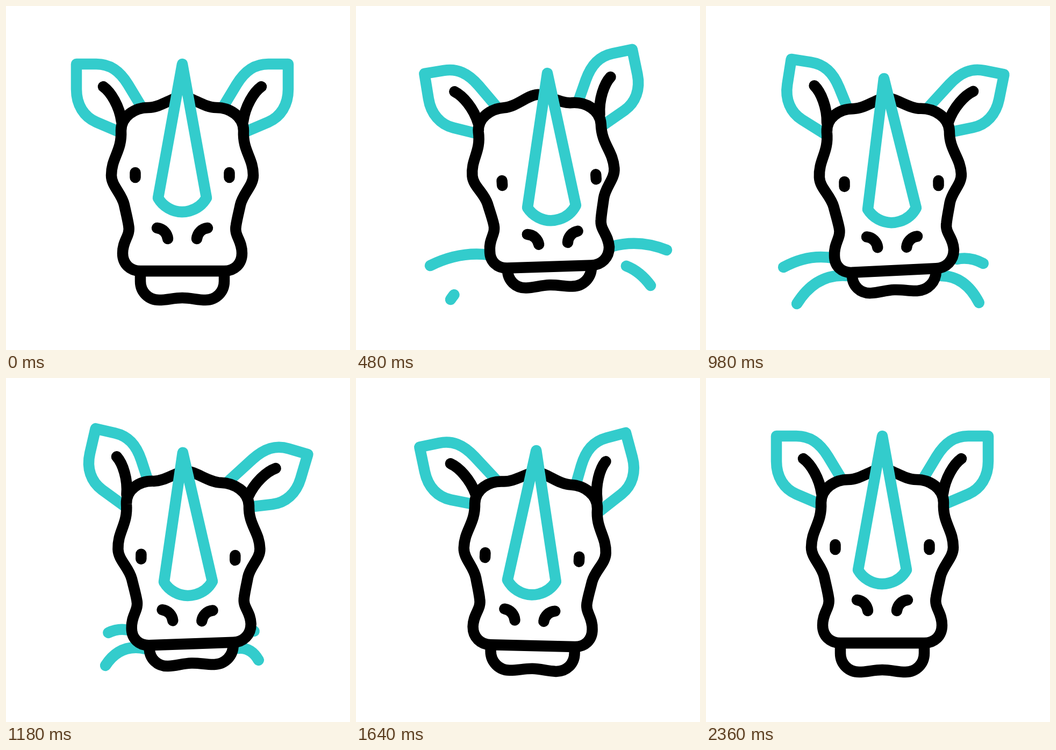
Recreate the animation shown at these times as an HTML page with a canvas. Size 640 by 640 pixels, loop 2.4 s.

```html
<!DOCTYPE html>
<html lang="en">
<head>
<meta charset="utf-8">
<title>Grazing rhino</title>
<style>
  html, body { margin: 0; width: 100%; height: 100%; overflow: hidden; background: #fff; }
  canvas { display: block; width: 100vmin; height: 100vmin; }
</style>
</head>
<body>
<canvas id="stage" width="640" height="640"></canvas>
<script>
const ctx = document.getElementById('stage').getContext('2d');
const TEAL = '#33cccc', BLACK = '#000', LOOP = 2400, AXIS = 328, DEG = Math.PI / 180;
const lerp = (a, b, u) => a + (b - a) * u;
const clamp = u => Math.max(0, Math.min(1, u));

// Smooth curve through timed values, flat at every local extreme.
function track(times, values, t) {
  const last = times.length - 1;
  if (t <= times[0]) return values[0];
  if (t >= times[last]) return values[last];
  const i = times.findIndex(time => time > t) - 1;
  const slope = k => {
    if (k === 0 || k === last) return 0;
    const before = values[k] - values[k - 1], after = values[k + 1] - values[k];
    return before * after <= 0 ? 0 : (before + after) / (times[k + 1] - times[k - 1]);
  };
  const d = times[i + 1] - times[i], u = (t - times[i]) / d, v = 1 - u;
  return v * v * (1 + 2 * u) * values[i] + u * u * (3 - 2 * u) * values[i + 1]
    + d * u * v * (v * slope(i) - u * slope(i + 1));
}

const POSE_TIMES = [0, 240, 480, 740, 980, 1380, 1920, 2360];
const POSE = {
  skullX:  [0, 8, 14, 12.5, 11, 9, 4.5, 0],
  skullY:  [0, -10, -5, -2, 1.5, 5.5, 6.5, 0],
  skullTurn: [0, -5, -3.8, -2.3, -0.6, 1.8, 2.8, 0],
  muzzleX: [0, 18, 32, 23.5, 22, 10.5, -6, 0],
  muzzleY: [0, -10, -8, -4, -1, 3.5, 6, 0],
  muzzleTurn: [0, -3, -1.9, 0, -2.8, -0.6, 2.7, 0],
  faceX:   [0, 20, 34, 25, 17.5, 4, -5.5, 0],
  faceY:   [0, -3, 9, 13, 16, 20.5, 14, 0],
  tipX:    [0, 17, 28, 23, 3, 2, 13, 0],
  tipY:    [0, 2, 17, 23, 27, 33, 16, 0],
  hornX:   [0, 21, 36, 27, 18, 5, -4.5, 0],
  hornY:   [0, 0, 16, 18.5, 20, 23, 14, 0],
  jaw:     [0, 0, -16, -14.5, -14, -14, 0, 0]
};
const EAR_TIMES = [0, 240, 440, 480, 610, 740, 980, 1180, 1380, 1600, 1920, 2150, 2360];
const EAR_TURN = [0, -16, -8.5, -9.2, -15, -12, 8.9, 13, 11.6, -13, 12.2, -15, 0];

// Left halves; the right halves are mirrored.
const HEAD = [[328,169], [310,169],[288,189],[265,189], [240,189],[214,205],[214,232],
  [216,270],[196,282],[196,315], [196,335],[215,348],[220,370], [222,380],[226,395],[228,408],
  [232,428],[217,435],[217,460], [217,480],[231,493],[250,493]];
const JAW = [[328,543], [312,543],[300,547],[285,547], [265,547],[250,532],[250,512],
  [250,506],[250,500],[250,493]];

const GRASS_TIMES = [480, 740, 980, 1180, 1380, 1520];
const GRASS = [
  { side: -1, reach: 113, bend: [0, -17], grow: [300, 460],
    x: [138, 139, 144, 190, 260, 260], y: [483, 460, 486, 474, 470, 470], root: [463, 455, 469, 470, 470, 470] },
  { side: 1, reach: 117, bend: [0, -17], grow: [280, 440],
    x: [578, 560, 516, 450, 400, 400], y: [454, 457, 479, 473, 470, 470], root: [447, 449, 471, 471, 470, 470] },
  { side: -1, reach: 85, bend: [-12, -32], grow: [470, 600],
    x: [176, 164, 169, 185, 200, 290], y: [546, 526, 554, 535, 519, 508], root: [500, 500, 502, 504, 506, 506] },
  { side: 1, reach: 87, bend: [12, -32], grow: [400, 560],
    x: [548, 535, 508, 470, 433, 380], y: [520, 523, 552, 525, 506, 506], root: [480, 490, 502, 503, 505, 505] }
];

function paint(color, build, fill) {
  ctx.beginPath();
  build();
  if (fill) ctx.fill();
  ctx.strokeStyle = color;
  ctx.stroke();
}

// The head bends: skull and muzzle each have their own shift and tilt.
function warp(pose, x, y) {
  const u = Math.min((y - 235) / 225, 1), dx = x - AXIS;
  const turn = lerp(pose.skullTurn, pose.muzzleTurn, u) * DEG;
  return [x + lerp(pose.skullX, pose.muzzleX, u), y + lerp(pose.skullY, pose.muzzleY, u) + dx * Math.tan(turn)];
}

function symmetric(half, pose, lift = 0) {
  const place = ([x, y]) => { const p = warp(pose, x, y); return [p[0], p[1] + lift]; };
  const left = half.map(place);
  const right = half.map(([x, y]) => place([2 * AXIS - x, y])).reverse();
  const curves = pts => {
    for (let i = 1; i < pts.length; i += 3) ctx.bezierCurveTo(...pts[i], ...pts[i + 1], ...pts[i + 2]);
  };
  ctx.moveTo(...left[0]);
  curves(left);
  ctx.lineTo(...right[0]);
  curves(right);
  ctx.closePath();
}

function drawEar(pose, side, turn) {
  ctx.save();
  ctx.translate(...warp(pose, AXIS + side * 114, 215));
  ctx.rotate(turn * DEG);
  ctx.scale(-side, 1);
  ctx.translate(-214, -215);
  paint(TEAL, () => {
    ctx.moveTo(262, 204);
    ctx.lineTo(227, 146);
    ctx.bezierCurveTo(211, 120, 193, 108, 168, 108);
    ctx.lineTo(131, 108);
    ctx.lineTo(131, 155);
    ctx.bezierCurveTo(131, 184, 145, 206, 168, 216);
    ctx.lineTo(222, 239);
  });
  paint(BLACK, () => {
    ctx.moveTo(181, 150);
    ctx.bezierCurveTo(195, 160, 211, 186, 215, 215);
  });
  ctx.restore();
}

function drawBlade(blade, pose, t) {
  const g = clamp((t - blade.grow[0]) / (blade.grow[1] - blade.grow[0]));
  if (g <= 0 || t > 1520) return;
  const at = values => track(GRASS_TIMES, values, t);
  const tip = [at(blade.x), at(blade.y)];
  const root = [AXIS + pose.muzzleX + blade.side * blade.reach, at(blade.root)];
  const size = clamp(Math.abs(tip[0] - root[0]) / 90);
  const bend = tip.map((v, i) => (v + root[i]) / 2 + blade.bend[i] * size);
  const c = tip.map((v, i) => lerp(v, bend[i], g));
  const end = c.map((v, i) => lerp(v, lerp(bend[i], root[i], g), g));
  paint(TEAL, () => {
    ctx.moveTo(...tip);
    ctx.quadraticCurveTo(...c, ...end);
  });
}

function drawFace(pose) {
  ctx.save();
  ctx.translate(AXIS + pose.faceX, 357 + pose.faceY);
  ctx.rotate(pose.skullTurn * DEG);
  for (const side of [-1, 1]) paint(BLACK, () => {
    ctx.moveTo(side * 87.5, -47);
    ctx.lineTo(side * 87.5, -38);
    ctx.moveTo(side * 47, 56);
    ctx.bezierCurveTo(side * 36, 57, side * 28, 66, side * 27, 76);
  });
  ctx.restore();
}

function drawHorn(pose) {
  const turn = lerp(pose.skullTurn, pose.muzzleTurn, 0.54) * DEG;
  const x = AXIS + pose.hornX + 26 * Math.sin(turn), y = 357 + pose.hornY - 26 * Math.cos(turn);
  paint(TEAL, () => {
    ctx.moveTo(AXIS + pose.tipX, 108 + pose.tipY);
    ctx.arc(x, y, 52, 30 * DEG + turn, 150 * DEG + turn);
    ctx.closePath();
  }, true);
}

function draw(now) {
  const t = now % LOOP, pose = {};
  for (const key in POSE) pose[key] = track(POSE_TIMES, POSE[key], t);
  const earTurn = track(EAR_TIMES, EAR_TURN, t);
  ctx.fillStyle = '#fff';
  ctx.fillRect(0, 0, 640, 640);
  ctx.lineWidth = 20.5;
  ctx.lineCap = ctx.lineJoin = 'round';
  GRASS.forEach(blade => drawBlade(blade, pose, t));
  drawEar(pose, -1, earTurn);
  drawEar(pose, 1, earTurn * 1.27);
  paint(BLACK, () => symmetric(JAW, pose, pose.jaw), true);
  paint(BLACK, () => symmetric(HEAD, pose), true);
  drawFace(pose);
  drawHorn(pose);
}

const start = performance.now();
function tick() {
  draw(performance.now() - start);
  requestAnimationFrame(tick);
}
tick();
</script>
</body>
</html>
```
